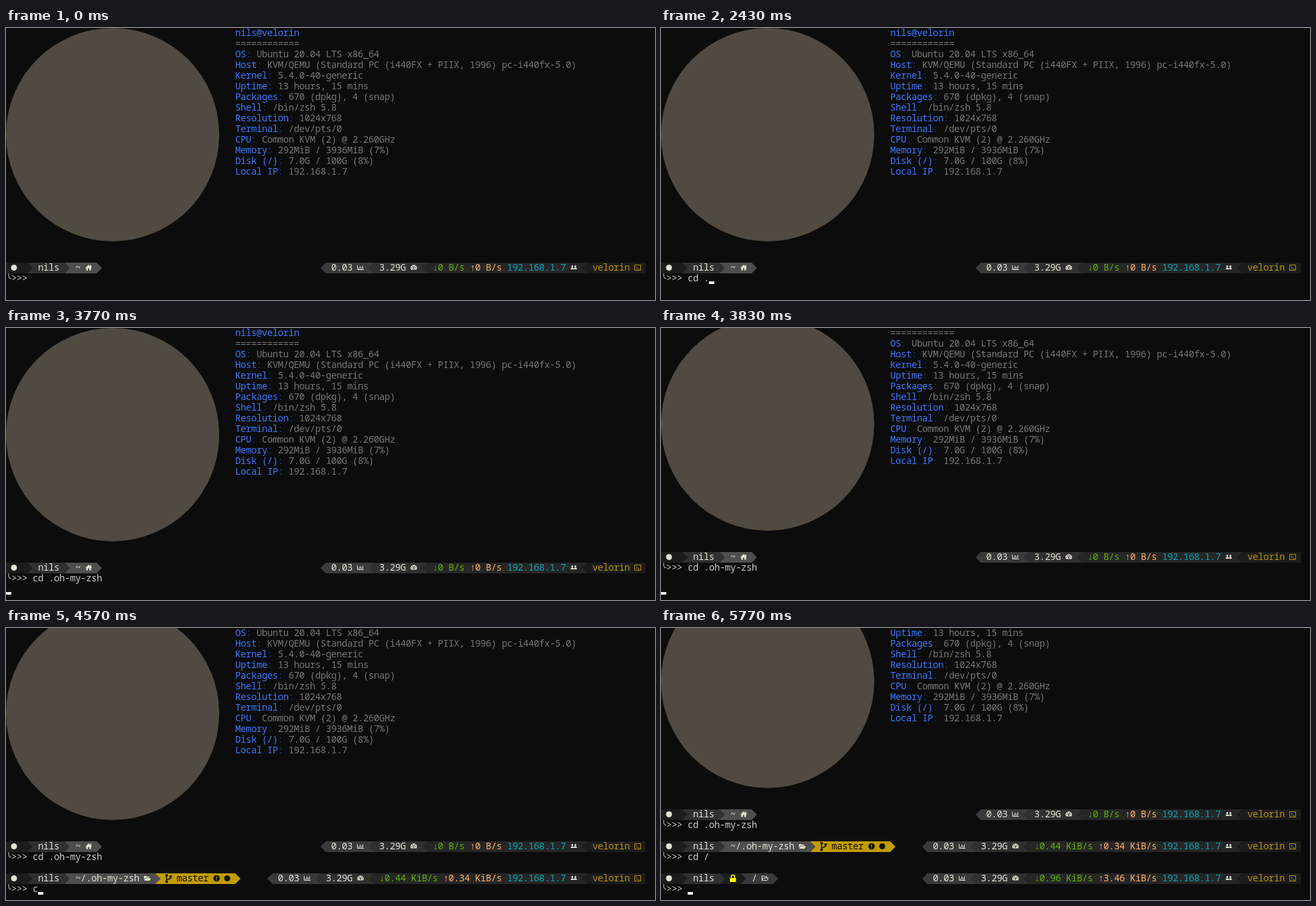
Animation of 974 by 408 pixels, one loop 8000 ms. Source, as an HTML page:

```html
<!DOCTYPE html>
<html lang="en">
<head>
<meta charset="utf-8">
<title>Terminal prompt</title>
<style>
  html, body { margin: 0; width: 100%; height: 100%; overflow: hidden; background: #0c0c0c; }
  svg { display: block; width: 974px; height: 408px; }
  text { font: 14px "Noto Sans Mono", "DejaVu Sans Mono", monospace; white-space: pre; }
</style>
</head>
<body>
<svg id="screen" viewBox="0 0 974 408">
  <g id="page"></g>
  <rect id="cursor" width="8" height="4" fill="#f2f2f2"/>
</svg>
<script>
const CELL = 8, ROW = 16, LOOP = 8000;
const USER = 'nils', HOST = 'velorin';
const CREAM = '#e4e0d4', BLUE = '#3b78ff', GREY = '#767676', GOLD = '#c19c00', WHITE = '#cccccc';

// Icons are centred on 0,0; "line" ones are stroked.
const dot = (x, y, r) => `M${x - r} ${y}a${r} ${r} 0 1 0 ${2 * r} 0a${r} ${r} 0 1 0 ${-2 * r} 0z`;
const person = (x, y) => dot(x, y - 2, 1.5) + `M${x - 2.3} ${y + 2.5}q0-2.7 2.3-2.7t2.3 2.7z`;
const ICONS = {
  disc: { d: dot(0, 0, 4.5) },
  home: { d: 'M-5 .5L0-4.5 2.5-2V-4H4V-.5L5 .5H3.6V4H1V1H-1V4H-3.6V.5Z' },
  chart: { d: 'M-4.5-3.5V3H5M-2.5 2V0M-.5 2V-2.5M1.5 2V-1M3.5 2V-3', line: 1 },
  gauge: { d: 'M-4 3A4.7 4.7 0 1 1 4 3Z' + dot(-2.8, .3, .7) + dot(2.8, .3, .7) +
    dot(-1.7, -2, .7) + dot(1.7, -2, .7) + 'M-.4-2H.4L1 2H-1Z' },
  users: { d: person(-2.2, 0) + person(2.5, 0) },
  term: { d: 'M-4.5-4H4.5V4H-4.5ZM-2.5-2L-.5 0-2.5 2M0 2.2H2.8', line: 1 },
  folder: { d: 'M-5 2.5V-3.5H-1.5L-.5-2.5H3V-1H-3ZM-4.5 3.5L-2.7-.2H5.5L3.5 3.5Z' },
  outline: { d: 'M-4.5 3V-3.5H-1.5L-.5-2.5H3V-.5M-4.5 3L-2.7-.5H5L3.2 3Z', line: 1 },
  branch: { d: dot(-3, -4.5, 1.3) + dot(-3, 5, 1.3) + dot(3.2, -2.5, 1.3) +
    'M-3-3V3.5M3.2-1C3.2 2-3 .5-3 3.5', line: 1.4 },
  warn: { d: dot(0, 0, 4.8) + 'M-.8-3H.8L.5 1H-.5Z' + dot(0, 2.5, .8) },
  lock: { d: 'M-4.5-.5H-3.2V-2.5A3.2 3.2 0 0 1 3.2-2.5V-.5H4.5V5.5H-4.5ZM-1.7-.5H1.7V-2.5A1.7 1.7 0 0 0-1.7-2.5Z' }
};

const text = (x, row, str, fill) =>
  `<text x="${x}" y="${row * ROW + 12}" fill="${fill}">${str}</text>`;

function icon(name, x, row, color = CREAM) {
  const { d, line } = ICONS[name];
  const paint = line
    ? `fill="none" stroke="${color}" stroke-width="${line}"`
    : `fill="${color}" fill-rule="evenodd"`;
  return `<path transform="translate(${x} ${row * ROW + 7.5})" d="${d}" ${paint}/>`;
}

// Overlapping arrow strips, longest first.
const strips = (edge, tip, row, list) => list.map(([x, fill]) =>
  `<path d="M${edge} ${row * ROW}H${x}l${tip} 8 ${-tip} 8H${edge}z" fill="${fill}"/>`).join('');

function leftBar(row, segments) {
  return strips(0, CELL, row, [...segments, [88, '#303030'], [32, '#1c1c1c']]) +
    icon('disc', 12, row) + text(48, row, USER, CREAM);
}

function rightBar(row, down, up) {
  const net = 744 - (down.length + up.length + 3) * CELL;
  return strips(960, -CELL, row, [
    [net - 160, '#3a3a3a'], [net - 88, '#303030'], [net - 8, '#262626'], [872, '#1c1c1c']
  ]) +
    text(net - 152, row, '0.03', CREAM) + icon('chart', net - 108, row) +
    text(net - 80, row, '3.29G', CREAM) + icon('gauge', net - 28, row) +
    text(net, row, '↓' + down, '#5faf00') +
    text(744 - (up.length + 1) * CELL, row, '↑' + up, '#ffaf5f') +
    text(752, row, '192.168.1.7', '#06a5b8') + icon('users', 852, row) +
    text(880, row, HOST, '#b8900c') + icon('term', 948, row, '#b8900c');
}

const prompt = (row, id) =>
  `<path d="M4 ${row * ROW}v4q0 4 4 4" fill="none" stroke="${WHITE}"/>` +
  text(8, row, '>>>', WHITE) +
  `<text id="${id}" x="40" y="${row * ROW + 12}" fill="${WHITE}"></text>`;

const info = [
  ['OS', 'Ubuntu 20.04 LTS x86_64'],
  ['Host', 'KVM/QEMU (Standard PC (i440FX + PIIX, 1996) pc-i440fx-5.0)'],
  ['Kernel', '5.4.0-40-generic'],
  ['Uptime', '13 hours, 15 mins'],
  ['Packages', '670 (dpkg), 4 (snap)'],
  ['Shell', '/bin/zsh 5.8'],
  ['Resolution', '1024x768'],
  ['Terminal', '/dev/pts/0'],
  ['CPU', 'Common KVM (2) @ 2.260GHz'],
  ['Memory', '292MiB / 3936MiB (7%)'],
  ['Disk (/)', '7.0G / 100G (8%)'],
  ['Local IP', '192.168.1.7']
];

const $ = id => document.getElementById(id);

$('page').innerHTML =
  '<circle cx="160" cy="160" r="160" fill="#504a42"/>' +
  text(344, 0, `${USER}@${HOST}`, BLUE) +
  text(344, 1, '='.repeat(12), GREY) +
  info.map(([label, value], i) => text(344, i + 2,
    `<tspan fill="${BLUE}">${label}</tspan><tspan fill="#0d3a8c">:</tspan> ${value}`, GREY)).join('') +

  leftBar(22, [[136, '#4e4e4e']]) +
  text(104, 22, '~', CREAM) + icon('home', 124, 22) +
  rightBar(22, '0 B/s', '0 B/s') + prompt(23, 'first') +

  '<g id="repo">' + leftBar(25, [[344, GOLD], [224, '#4e4e4e']]) +
  text(104, 25, '~/.oh-my-zsh', CREAM) + icon('folder', 212, 25) +
  icon('branch', 244, 25, '#0c0c0c') + text(256, 25, 'master', '#0c0c0c') +
  icon('warn', 316, 25, '#0c0c0c') + icon('disc', 332, 25, '#0c0c0c') +
  rightBar(25, '0.44 KiB/s', '0.34 KiB/s') + prompt(26, 'second') + '</g>' +

  '<g id="root">' + leftBar(28, [[168, '#3a3a3a'], [120, '#1c1c1c']]) +
  icon('lock', 108, 28, '#ffff00') +
  text(136, 28, '/', CREAM) + icon('outline', 156, 28) +
  rightBar(28, '0.96 KiB/s', '3.46 KiB/s') + prompt(29, 'third') + '</g>';

// Set the font on the terminal's cell grid.
$('first').textContent = '0'.repeat(10);
$('screen').style.letterSpacing = CELL - $('first').getComputedTextLength() / 10 + 'px';

// Each list holds [start time, value].
const firstKeys = [[0, ''], [1570, 'c'], [1630, 'cd'], [1900, 'cd '], [2430, 'cd .'], [2630, 'cd .o'],
  [2770, 'cd .oh'], [2970, 'cd .oh-my-zsh/'], [3770, 'cd .oh-my-zsh']];
const secondKeys = [[0, ''], [4570, 'c'], [4630, 'cd'], [4770, 'cd '], [5100, 'cd /']];
const scrolls = [[0, 0], [3830, 1], [3900, 2], [5770, 5]];
const at = (steps, t) => steps.filter(([start]) => start <= t).pop()[1];

function frame() {
  const t = performance.now() % LOOP;
  const first = at(firstKeys, t), second = at(secondKeys, t);
  $('first').textContent = first;
  $('second').textContent = second;
  $('page').setAttribute('transform', `translate(0 ${-ROW * at(scrolls, t)})`);
  $('repo').style.display = t < 3900 ? 'none' : '';
  $('root').style.display = t < 5770 ? 'none' : '';

  const col = t < 3770 ? 5 + first.length : t < 3900 ? 0 : t < 5770 ? 5 + second.length : 5;
  const cursor = $('cursor');
  cursor.style.display = t < 500 ? 'none' : '';
  cursor.setAttribute('x', col * CELL);
  cursor.setAttribute('y', (t < 3770 ? 24 : 25) * ROW - 4);
  requestAnimationFrame(frame);
}
frame();
</script>
</body>
</html>
```
